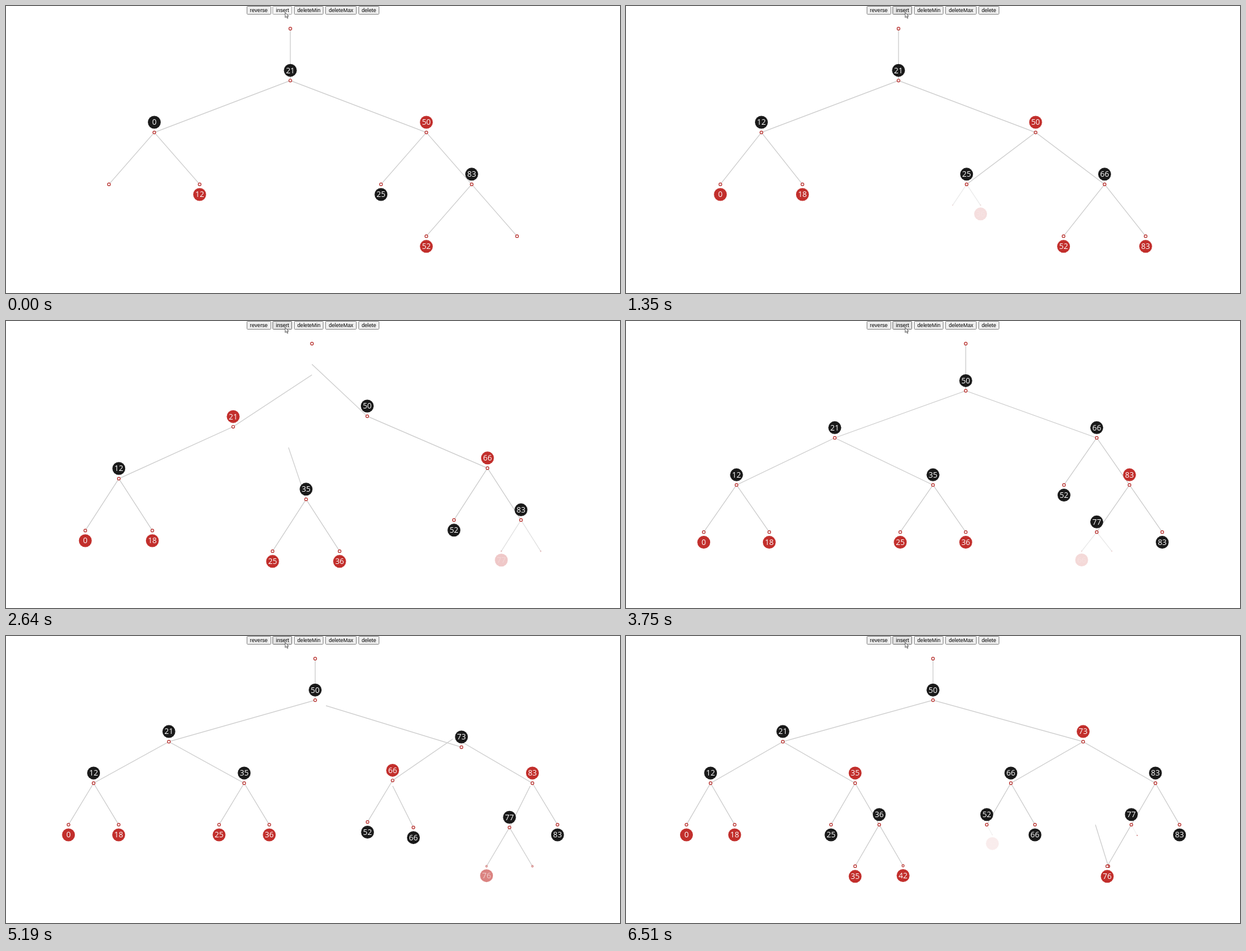
Recreate the animation shown at these times as an HTML page with a canvas. Size 1000 px wide and 469 px high, loop 6540 ms.

```html
<!DOCTYPE html>
<html lang="en">
<head>
<meta charset="utf-8">
<title>Red-black tree insertion</title>
<style>
  html, body { margin: 0; width: 100%; height: 100%; overflow: hidden; background: #fff; }
  canvas { position: absolute; left: 0; top: 0; width: 1000px; height: 469px; }
  .button {
    position: absolute; top: -0.3px; height: 14.6px; box-sizing: border-box;
    border: 0.8px solid #858585; border-radius: 1.6px; background: #efefef; color: #000;
    font: 8.67px/13px "Liberation Sans", Arial, sans-serif; text-align: center; white-space: nowrap;
  }
  #insert { background: #e3e3e3; border-color: #6c6c6c; }
  #insert.pressed { background: #f6f6f6; border-color: #a0a0a0; }
  #pointer { position: absolute; left: 454px; top: 10px; }
</style>
</head>
<body>
<canvas id="stage"></canvas>
<div class="button" style="left:392px;width:39.5px">reverse</div>
<div class="button" style="left:434.3px;width:32px" id="insert">insert</div>
<div class="button" style="left:469.3px;width:48px">deleteMin</div>
<div class="button" style="left:520.2px;width:51px">deleteMax</div>
<div class="button" style="left:574px;width:34px">delete</div>
<svg id="pointer" width="8" height="12" viewBox="0 0 8 12">
  <path d="M.7.7V8.8L2.6 7.1 4 10.2 5.3 9.6 3.9 6.6H6.3Z" fill="#fff" stroke="#222" stroke-width=".7"/>
</svg>
<script>
const LOOP = 6540, MOVE = 500, PRESS = 190;
const RED = '#c22f2c', BLACK = '#1a1a1a';
const AREA = { left: 20, width: 960, top: 37, height: 339.2 };

// Each insertion: start time and value
const inserts = [
  [40, 18], [655, 66], [1272, 36], [1890, 35], [2509, 77], [3083, 83],
  [3658, 66], [4358, 73], [4893, 76], [5490, 35], [6084, 42], [6466, 59]
];

const node = (value, red = false, l = null, r = null) => ({ value, red, l, r });
const isRed = n => !!n && n.red;
const opposite = { l: 'r', r: 'l' };

function rotate(h, side) {
  const other = opposite[side], top = h[other];
  h[other] = top[side];
  top[side] = h;
  return top;
}

// Top-down 2-3-4 style insertion
function insertInto(h, value, cameFrom) {
  if (!h) return node(value, true);
  if (isRed(h.l) && isRed(h.r)) {
    h.red = true;
    h.l.red = h.r.red = false;
  }
  const side = value < h.value ? 'l' : 'r', other = opposite[side];
  h[side] = insertInto(h[side], value, side);
  if (isRed(h) && isRed(h[side]) && cameFrom === other) h = rotate(h, other);
  if (isRed(h[side]) && isRed(h[side][side])) {
    h = rotate(h, other);
    h.red = false;
    h[other].red = true;
  }
  return h;
}

function insert(tree, value) {
  const root = insertInto(structuredClone(tree), value, 'l');
  root.red = false;
  return root;
}

// Display tree: a lone child gets an empty sibling
function view(h) {
  if (!h) return { label: '', kids: [] };
  const kids = h.l || h.r ? [view(h.l), view(h.r)] : [];
  return { label: String(h.value), red: h.red, kids };
}

function contour(kids, side) {
  const order = side === 'left' ? kids : [...kids].reverse();
  const depth = Math.max(0, ...kids.map(k => k[side].length));
  return Array.from({ length: depth }, (_, d) => {
    const k = order.find(k => d < k[side].length);
    return k[side][d] + k.dx;
  });
}

// Tidy layout: siblings one unit apart, cousins two
function arrange(n) {
  n.kids.forEach(arrange);
  n.kids.forEach(k => { k.dx = 0; });
  if (n.kids.length === 2) {
    const [a, b] = n.kids;
    let gap = 1;
    for (let d = 0; d < Math.min(a.right.length, b.left.length); d++)
      gap = Math.max(gap, a.right[d] - b.left[d] + (d ? 2 : 1));
    a.dx = -gap / 2;
    b.dx = gap / 2;
  }
  n.left = [0, ...contour(n.kids, 'left')];
  n.right = [0, ...contour(n.kids, 'right')];
}

function layout(tree) {
  const root = { label: '', kids: [view(tree)] };
  arrange(root);
  const min = Math.min(...root.left), max = Math.max(...root.right);
  const unit = AREA.width / (max - min + 2);
  const level = AREA.height / (root.left.length - 1);
  const items = new Map(), seen = {};
  (function walk(n, offset, depth, parent) {
    seen[n.label] = (seen[n.label] || 0) + 1;
    const key = n.label + '#' + seen[n.label];
    const x = AREA.left + (offset - min + 1) * unit, y = AREA.top + depth * level;
    const item = {
      key, x, y, px: parent ? parent.x : x, py: parent ? parent.y : y,
      parent: parent && parent.key, label: n.label, red: n.red, leaf: !n.kids.length,
      size: 1, alpha: 1, line: 1
    };
    items.set(key, item);
    n.kids.forEach(k => walk(k, offset + k.dx, depth + 1, item));
  })(root, 0, 0, null);
  return items;
}

const mix = (a, b, k) => a + (b - a) * k;

function pose(step, time) {
  const u = Math.min(1, (time - step.start) / MOVE), e = 1 - (1 - u) ** 3;
  return step.tweens.map(({ from, to }) => {
    const now = { ...to };
    for (const p of ['x', 'y', 'px', 'py', 'line']) now[p] = mix(from[p], to[p], e);
    for (const p of ['size', 'alpha']) now[p] = mix(from[p], to[p], to.size ? u : e);
    return now;
  });
}

function transition(previous, start, target) {
  const current = new Map(pose(previous, start).filter(i => i.size > 0).map(i => [i.key, i]));
  const origin = new Map(), tweens = [];
  for (const [key, to] of target) {
    const old = current.get(key);
    let from;
    if (old) from = { ...old, alpha: 1 };
    else {
      const { x, y } = origin.get(to.parent);
      from = { ...to, x, y, px: x, py: y, size: 0, alpha: 0, line: 0 };
    }
    origin.set(key, from);
    tweens.push({ from, to });
  }
  for (const [key, from] of current)
    if (!target.has(key))
      tweens.push({ from, to: { ...from, x: from.px, y: from.py, size: 0, alpha: 0, line: 0 } });
  return { start, tweens };
}

let tree = node(21, false,
  node(0, false, null, node(12, true)),
  node(50, true, node(25), node(83, false, node(52, true))));
const steps = [{ start: -MOVE, tweens: [...layout(tree).values()].map(i => ({ from: i, to: i })) }];
for (const [start, value] of inserts) {
  tree = insert(tree, value);
  steps.push(transition(steps[steps.length - 1], start, layout(tree)));
}

const canvas = document.getElementById('stage'), ctx = canvas.getContext('2d');
const button = document.getElementById('insert');
const ratio = window.devicePixelRatio || 1;
canvas.width = 1000 * ratio;
canvas.height = 469 * ratio;

function disc(x, y, r) {
  ctx.beginPath();
  ctx.arc(x, y, r, 0, Math.PI * 2);
}

function drawEdge(i) {
  ctx.globalAlpha = i.line;
  ctx.beginPath();
  ctx.moveTo(i.px, i.py);
  ctx.lineTo(i.x, i.y);
  ctx.stroke();
}

function drawNode(i) {
  ctx.globalAlpha = i.alpha;
  disc(i.x, i.y, 2.3 * i.size);
  ctx.fillStyle = '#fff';
  ctx.fill();
  ctx.strokeStyle = '#b8322f';
  ctx.stroke();
  if (!i.label) return;
  const y = i.y + (i.leaf ? 1 : -1) * (13.8 + 2.8 * i.size);
  disc(i.x, y, 10.5);
  ctx.fillStyle = i.red ? RED : BLACK;
  ctx.fill();
  ctx.fillStyle = '#fff';
  ctx.fillText(i.label, i.x, y + 4.4);
}

function draw(time) {
  ctx.setTransform(ratio, 0, 0, ratio, 0, 0);
  ctx.clearRect(0, 0, 1000, 469);
  ctx.font = '12.6px "Open Sans", "Noto Sans", sans-serif';
  ctx.textAlign = 'center';
  const items = pose(steps.filter(s => s.start <= time).pop(), time);
  ctx.strokeStyle = '#ccc';
  ctx.lineWidth = 1.25;
  items.forEach(drawEdge);
  ctx.lineWidth = 1.2;
  items.forEach(drawNode);
  button.classList.toggle('pressed', inserts.some(([s]) => time >= s - PRESS && time < s));
}

const begin = performance.now();
function tick() {
  draw((performance.now() - begin) % LOOP);
  requestAnimationFrame(tick);
}
tick();
</script>
</body>
</html>
```
